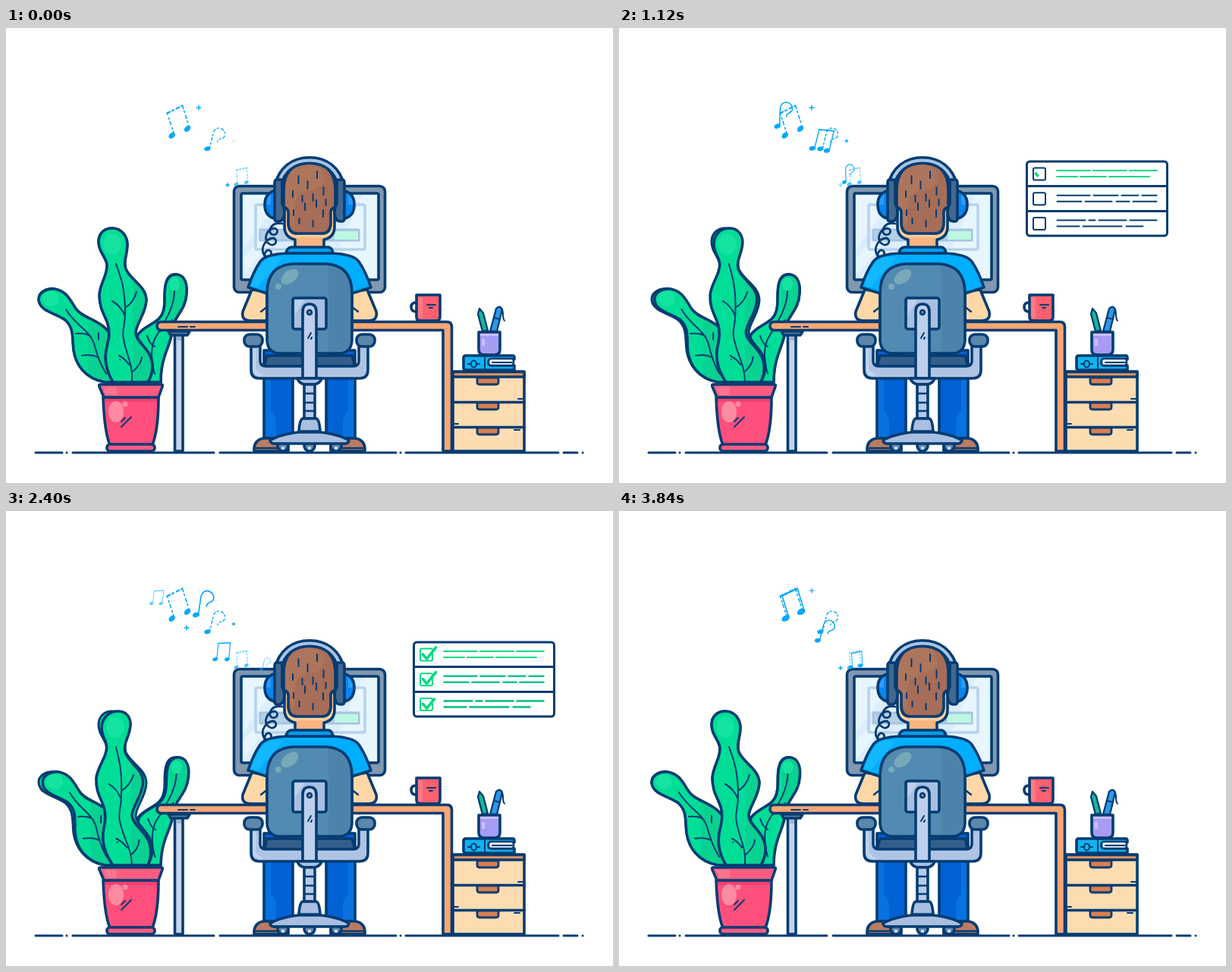
Animation, 800 px wide and 600 px high, one loop 3.88 s. Source, as an HTML page:

```html
<!DOCTYPE html>
<html lang="en">
<head>
<meta charset="utf-8">
<title>Working with music</title>
<style>
html, body { margin: 0; width: 100%; height: 100%; overflow: hidden; background: #fff; }
svg { display: block; }
#stage { stroke: #043c72; stroke-width: 3.6; stroke-linecap: round; stroke-linejoin: round; }
.fill { stroke: none; }
.line { fill: none; }
.thin { fill: none; stroke-width: 2; }
.blue { stroke: #00a8ff; fill: none; }
.head { fill: #00a8ff; stroke: none; }
.trace { stroke-width: 1.1; stroke-dasharray: 4 3 2 4; }
.done { stroke: #00d981; }
.rest { fill: #00dc96; stroke-width: 3; }
</style>
</head>
<body>
<svg id="stage" width="800" height="600" viewBox="0 0 800 600">
<defs>
  <linearGradient id="leafShade"><stop offset=".64" stop-color="#00dd97"/><stop offset=".64" stop-color="#08d192"/></linearGradient>
  <linearGradient id="chairShade"><stop offset=".72" stop-color="#528ab1"/><stop offset=".72" stop-color="#4d83ab"/></linearGradient>
  <g id="double">
    <path stroke-width="1.5" d="M-7,14V-14M14,-17V12"/><path stroke-width="2" d="M-7,-14L14,-17"/>
    <ellipse class="head" cx="-10" cy="14.5" rx="4.600" ry="3.200" transform="rotate(-25 -10 14.5)"/>
    <ellipse class="head" cx="11" cy="12.5" rx="4.600" ry="3.200" transform="rotate(-25 11 12.5)"/>
  </g>
  <g id="single">
    <path stroke-width="1.6" d="M-3,15V-10C-2,-22 14,-20 14,-9C14,-3 6,-5 6,2"/>
    <ellipse class="head" cx="-6" cy="15.5" rx="4.600" ry="3.200" transform="rotate(-25 -6 15.5)"/>
  </g>
</defs>

<path class="line" stroke-width="3" d="M39,560H74M80,560h.1M88,560H274M282,560H514M520,560h.1M527,560H728M735,560H753M760,560h.1"/>

<g id="plant"></g>
<g id="pot">
  <path fill="#ff4f7d" d="M128,487C129,515 131,538 138,552H192C199,536 201,510 201,487Z"/>
  <path class="fill" fill="#f43f71" d="M130,489H199V493H131Z"/>
  <ellipse class="fill" fill="#ff8b9f" cx="145" cy="506" rx="10" ry="14"/>
  <circle class="fill" fill="#ff8b9f" cx="157" cy="496" r="3.5"/>
  <path class="thin" d="M152,526L165,513M152,519L157,514"/>
  <path fill="#ff5c82" d="M124,470H205Q207,470 206,473L201,487H129L123,473Q122,470 124,470Z"/>
  <path class="fill" fill="#ff7590" d="M128,473H146V484H132Z"/>
  <rect x="133" y="549" width="63" height="9" rx="4" fill="#ff5c82"/>
</g>

<g id="monitor">
  <rect x="300.500" y="208.500" width="199" height="140" rx="7" fill="#8298b1"/>
  <rect x="310" y="218" width="181" height="114" rx="2" fill="#daeeff"/>
  <path class="fill" fill="#e7f5ff" d="M312,220H366L312,292ZM312,304L386,220H402L314,325ZM470,220H489V330H420Z"/>
  <rect class="line" x="329" y="233" width="144" height="59" rx="2" stroke="#b7d2ec"/>
  <rect x="335" y="266" width="130" height="14" fill="#b5cfe6" stroke="#a8c3df" stroke-width="3"/>
  <rect class="fill" x="433" y="268" width="31" height="11" fill="#bdf7e2"/>
</g>

<g id="desk">
  <rect x="222.500" y="402" width="10.500" height="156" fill="#c6d4ea"/>
  <path class="fill" fill="#9db4d4" d="M224,406H231V412H224Z"/>
  <path fill="#5f84a8" d="M214,400H242L239,405H217Z"/>
  <path fill="#fba674" d="M204,387.500H581Q587.500,387.500 587.500,394V558H576V398.500H204Q199,398 199,393Q199,388 204,387.500Z"/>
  <path class="thin" d="M227,394H239M243,394H249"/>
</g>

<g id="mug">
  <path class="line" d="M541,362Q534,362 534,368Q534,374 541,374"/>
  <path fill="#ff6070" d="M541,352H572V381Q572,386 567,386H546Q541,386 541,381Z"/>
  <path class="fill" fill="#ff7a84" d="M543,355H549V383H546Q543,383 543,380Z"/>
  <path class="thin" d="M555,365H566M558,369H562" stroke-width="1.800"/>
</g>

<g id="drawers">
  <rect x="589" y="453" width="94" height="105" fill="#fddcb2"/>
  <rect x="589" y="453.500" width="94" height="6.500" fill="#e4925e"/>
  <path class="line" d="M589,493.500H683M589,526.500H683"/>
  <path fill="#d97f4f" stroke-width="2.800" d="M621,461H649V467Q649,470 646,470H624Q621,470 621,467ZM621,494H649V500Q649,503 646,503H624Q621,503 621,500ZM621,527H649V533Q649,536 646,536H624Q621,536 621,533Z"/>
  <path class="thin" d="M675,489H681M590,522H596M670,530H677"/>
</g>

<g id="books">
  <path fill="#11b2ef" d="M606,432H668Q670,432 670,435V437H641Q636,437 636,441Q636,445 641,445H670V451H606Q603,451 603,448V435Q603,432 606,432Z"/>
  <rect x="636" y="436" width="33" height="9" rx="3" fill="#e8f2fb" stroke-width="2.500"/>
  <path class="thin" d="M641,441H667M631,433V450M609,443h3M621,443h3" stroke-width="1.800"/>
  <ellipse class="thin" cx="616.500" cy="443" rx="3.500" ry="4.500"/>
  <path fill="#16b79a" stroke-width="2.300" d="M628,400L622,377L624,370L629,376L635,399Z"/>
  <path fill="#2c98e8" stroke-width="2.300" d="M638,400L646,370Q651,365 654,371L647,400Z"/>
  <path class="thin" stroke-width="1.800" d="M643,382L651,384M653,370C657,374 653,381 657,386"/>
  <path fill="#a89bf3" d="M623,401H651V424Q651,431 644,431H630Q623,431 623,424Z"/>
  <path class="fill" fill="#c9c0ff" d="M625,403H649V406H625ZM627,410H631V419H627Z"/>
</g>

<path class="line" stroke-width="2.800" d="M364,258C350,255 344,268 350,272C357,275 361,266 354,264C343,265 339,279 346,284C353,290 360,281 353,277C342,277 335,290 340,299C346,306 354,297 347,293C342,292 339,300 342,305"/>

<g id="man">
  <g id="legSide">
    <path fill="#0062d5" d="M340,425H378V541H340Z"/>
    <path class="fill" fill="#0872de" d="M342,463H349V505Q356,510 356,520V539H342Z"/>
    <path fill="#bb7b62" d="M340,541H368Q373,548 372,558H327Q326,543 340,541Z"/>
    <path class="line" stroke-width="2.500" d="M328,554H372"/>
  </g>
  <use href="#legSide" transform="matrix(-1 0 0 1 800 0)"/>
  <g id="armSide">
    <path fill="#ffd7a7" d="M324,345L312,374Q310,386 322,386H345V348Z"/>
    <path class="line" stroke-width="2.500" d="M345,367L336,374"/>
  </g>
  <use href="#armSide" transform="matrix(-1 0 0 1 800 0)"/>
  <path fill="#ffd09b" d="M367,236V262Q367,276 381,279V292H419V279Q433,276 433,262V236Z"/>
  <path class="fill" fill="#f8b581" d="M383,276H417V288H383Z"/>
  <path fill="#00aeff" d="M372,297H428Q458,298 465,308Q474,321 481,342L456,350V400H344V350L319,342Q326,321 335,308Q342,298 372,297Z"/>
  <path class="fill" fill="#14b8ff" d="M348,302H366L332,342L323,340Q332,310 348,302Z"/>
  <path fill="#099cec" d="M376,289H425Q430,290 431,297H369Q370,290 376,289Z"/>
  <path fill="#a66d58" d="M366,214Q366,178 400,178Q434,178 434,214V236Q427,238 428,246V259Q427,271 416,271H384Q373,271 372,259V246Q373,238 366,236Z"/>
  <path class="fill" fill="#ae755d" d="M368,214Q369,181 400,180Q418,182 420,196Q419,212 400,214Q381,216 380,236V262Q375,261 374,250Q376,238 368,234Z"/>
  <path class="thin" stroke-width="1.600" d="M385.500,195v10M410,189v9M397.500,202v10M378,215v8M418.500,210v10M390.500,221v8M404.500,219v9M421.500,226v8M394,231v9M409,227v9M379,240v7M386.500,251v7M418,240v9M404.500,254v8"/>
  <path class="line" stroke-width="11" d="M358,208C363,186 379,174.500 400,174.500S437,186 442,208"/>
  <path class="line" stroke="#a9c4e5" stroke-width="4" d="M358,209C363,186 379,174.500 400,174.500S437,186 442,209"/>
  <g id="earSide">
    <path fill="#0786ef" d="M358,214Q341,216 341,233Q341,250 358,252Z"/>
    <path class="fill" fill="#2b9bfa" d="M349,219Q343,224 343,233H349Z"/>
    <path fill="#42688f" d="M357,200H363Q364,200 364,205V232Q367,236 367,244Q366,255 360,255H357Q354,255 354,250V204Q354,200 357,200Z"/>
  </g>
  <use href="#earSide" transform="matrix(-1 0 0 1 800 0)"/>
</g>

<g id="chair">
  <path fill="#345f8b" d="M344,432H456L460,446H340Z"/>
  <path fill="#afc4e4" d="M323,416H335V440Q336,446 342,446H458Q464,446 465,440V416H477V451Q477,462 466,462H334Q323,462 323,451Z"/>
  <path class="fill" fill="#c3d4ee" d="M326,423H329V448Q330,454 338,457V459Q326,460 326,450Z"/>
  <rect x="314" y="404" width="24" height="16" rx="7" fill="#5b87aa"/>
  <rect x="462" y="404" width="24" height="16" rx="7" fill="#5b87aa"/>
  <path fill="url(#chairShade)" d="M378,311H422Q455,313 456,348V412Q455,428 440,429H360Q345,428 344,412V348Q345,313 378,311Z"/>
  <ellipse class="fill" fill="#78a9b9" cx="374" cy="328" rx="13" ry="8" transform="rotate(-38 374 328)"/>
  <circle class="fill" fill="#78a9b9" cx="359" cy="341" r="4"/>
  <rect x="378" y="356" width="44" height="41" rx="3" fill="#a8bfe1"/>
  <path class="fill" fill="#bed1ed" d="M381,359H393L381,378Z"/>
  <path fill="#bdcfec" d="M391,462V374Q391,364 400,364T409,374V462Z"/>
  <circle cx="400" cy="375" r="3" fill="#6c8bb0" stroke-width="2.500"/>
  <path class="thin" d="M398,409L402,402M402,410L403,408"/>
  <path fill="#a8bfe1" d="M384,462H416Q414,469 406,470H394Q386,469 384,462Z"/>
  <path fill="#b7cae7" d="M393,470H407V515H393Z"/>
  <path class="line" stroke-width="2.500" d="M394,482H406M394,494H406M394,505H406"/>
  <path fill="#a8bfe1" d="M391,515H409Q413,516 414,532H386Q387,516 391,515Z"/>
  <g fill="#6484aa"><circle cx="365" cy="551" r="7"/><circle cx="400" cy="551" r="7"/><circle cx="435" cy="551" r="7"/></g>
  <path fill="#a8bfe1" d="M386,533H414Q440,536 452,544Q451,549 444,548H356Q349,549 348,544Q360,536 386,533Z"/>
  <path class="fill" d="M363,552h4v4h-4zM398,552h4v4h-4zM433,552h4v4h-4z" fill="#c8d9f0"/>
</g>

<path id="wisp" class="line" stroke="#aebbca" stroke-width="1.200" d="M552,345Q561,342 557,336Q551,331 556,327"/>
<path id="puff" class="line" stroke="#bdc8d6" stroke-width="1.200" d="M546,306C547,293 565,293 565,309"/>

<g id="card"></g>

<g class="blue trace">
  <use href="#double" transform="translate(224 124) rotate(-18) scale(1.050)"/>
  <use href="#single" transform="translate(274 147) rotate(14) scale(.9)"/>
  <use href="#double" transform="translate(309 196) rotate(-5) scale(.65)" opacity=".7"/>
</g>
<g id="notes" class="blue"></g>
<g id="sparks" class="blue" stroke-width="1.500"></g>
</svg>

<script>
const LOOP = 3880;
const $ = id => document.getElementById(id);
const clamp = v => Math.max(0, Math.min(1, v));

function add(parent, tag, attrs) {
  const el = document.createElementNS('http://www.w3.org/2000/svg', tag);
  for (const name in attrs) el.setAttribute(name, attrs[name]);
  return parent.appendChild(el);
}

// Linear interpolation through rows of [time, value, value, ...]
function track(rows, t) {
  if (t <= rows[0][0]) return rows[0].slice(1);
  const i = rows.findIndex(row => row[0] > t);
  if (i < 0) return rows[rows.length - 1].slice(1);
  const a = rows[i - 1], b = rows[i], p = (t - a[0]) / (b[0] - a[0]);
  return a.slice(1).map((v, n) => v + (b[n + 1] - v) * p);
}

// Plant: each leaf bends by a horizontal offset that depends on height
const breeze = t => (1 - Math.cos(2 * Math.PI * t / LOOP)) / 2;
const leaves = [
  {
    body: 'M186,467C186,450 168,420 174,404C184,390 205,390 208,370C210,362 208,352 210,340C212,328 218,324 226,325C236,327 239,338 238,350C237,372 222,380 220,394C218,420 204,430 204,467Z',
    vein: 'M222,347C222,370 206,392 196,410Q188,428 196,456M186,406Q190,418 196,420M219,385Q211,396 203,400',
    shine: [222, 338, 7, 9],
    bend: (h, t) => track([[0, 0], [1200, 0], [2700, 4], [3240, 4], [3840, .5], [LOOP, 0]], t)[0] * h * 1.35
  }, {
    body: 'M130,467C104,462 92,444 89,425C87,408 90,396 78,385C66,376 44,374 43,358C43,348 54,343 64,344C80,347 84,358 92,370C100,382 120,384 132,397Q142,405 145,425L145,467Z',
    vein: 'M79,371C91,392 109,397 116,416Q122,440 132,456M92,403Q106,402 112,407M122,402L122,411M100,432Q113,430 120,434',
    shine: [59, 357, 11, 10],
    bend: (h, t) => breeze(t) * 6 * Math.min(1, h * 2)
  }, {
    body: 'M141,467C132,452 129,436 133,420C136,408 137,400 134,390C130,378 123,370 123,352C124,336 134,326 133,312C131,300 122,296 122,282C122,270 130,264 140,264C152,264 160,274 160,286C160,300 154,306 158,318C164,332 184,340 185,358C185,376 171,390 171,402C172,416 193,424 193,446C193,454 190,462 187,467Z',
    vein: 'M145,311C152,330 157,345 157,375C157,395 152,400 155,410C158,430 168,445 166,466M140,360Q151,366 157,380M172,348Q168,362 157,369M149,432Q157,436 162,444M179,434Q178,444 167,453M150,437h.1',
    shine: [140, 285, 12, 14],
    bend: (h, t) => breeze(t) * (40 * h * h - 31 * h)
  }
];
for (const leaf of leaves) {
  add($('plant'), 'path', { class: 'rest', d: leaf.body });
  leaf.bodyEl = add($('plant'), 'path', { fill: 'url(#leafShade)', d: leaf.body });
  const [cx, cy, rx, ry] = leaf.shine;
  leaf.shineEl = add($('plant'), 'ellipse', { class: 'fill', fill: '#14e4a0', cx, cy, rx, ry });
  leaf.veinEl = add($('plant'), 'path', { class: 'thin', d: leaf.vein });
}
function drawPlant(t) {
  for (const { body, vein, shine, bend, bodyEl, veinEl, shineEl } of leaves) {
    const shift = y => bend((467 - y) / 203, t);
    const warp = d => d.replace(/([\d.]+),([\d.]+)/g, (_, x, y) => `${+x + shift(y)},${y}`);
    bodyEl.setAttribute('d', warp(body));
    veinEl.setAttribute('d', warp(vein));
    shineEl.setAttribute('cx', shine[0] + shift(shine[1]));
  }
}

// Checklist card, drawn from its own top-left corner
const rows = [
  { start: 1080, d: 'M40,12H83M88,12H131M136,12H171M40,20H66M71,20H104M109,20H161' },
  { start: 1500, d: 'M40,12H83M88,12H120M125,12H147M152,12H171M40,20H72M77,20H112M118,20H135M140,20H171' },
  { start: 2120, d: 'M40,12H77M82,12H90M95,12H131M136,12H171M40,20H69M74,20H125M131,20H153' }
];
add($('card'), 'rect', { width: 185, height: 98, rx: 4, fill: '#fff', 'stroke-width': 3 });
add($('card'), 'path', { class: 'line', 'stroke-width': 3, d: 'M0,32.500H185M0,65.500H185' });
rows.forEach((row, i) => {
  const g = add($('card'), 'g', { transform: `translate(0 ${i * 32.7})` });
  row.box = add(g, 'rect', { class: 'thin', x: 8.5, y: 8.5, width: 16, height: 16, rx: 2 });
  add(g, 'path', { class: 'thin', d: row.d });
  row.wipe = add(g, 'svg', { width: 0, height: 30 });
  add(row.wipe, 'path', { class: 'thin done', d: row.d });
  row.tick = add(g, 'path', { class: 'line done', d: 'M12,16L17,22L29,7', pathLength: 1 });
});
function drawCard(t) {
  const [y, opacity] = track([[200, 202, 0], [480, 188.5, .48], [740, 179, 1], [1120, 176, 1], [2040, 171.5, 1],
    [2760, 174.5, 1], [3080, 172, 1], [3240, 167, .7], [3520, 150, 0]], t);
  $('card').setAttribute('transform', `translate(537.500 ${y})`);
  $('card').setAttribute('opacity', opacity);
  for (const { start, box, wipe, tick } of rows) {
    const p = clamp((t - start) / 320);
    box.style.stroke = p > .3 ? '#00d981' : '';
    wipe.setAttribute('width', 180 * clamp((t - start + 260) / 280));
    tick.setAttribute('opacity', p > 0 ? 1 : 0);
    tick.setAttribute('stroke-dasharray', `${p} 2`);
  }
}

// Notes leave the headphones at equal intervals: age, x, y, rotation, scale, opacity
const flight = [
  [-300, 350, 216, 10, .3, 0], [-150, 346, 210, 12, .45, .5], [0, 340, 201, 12, .5, .7],
  [490, 309, 196, -5, .65, 1], [970, 283, 185, 6, .75, 1], [1310, 272, 165, 14, .85, 1],
  [1610, 267, 148, 14, .92, 1], [1940, 258, 121, 8, 1, 1], [2280, 230, 119, -18, 1.05, 1],
  [2400, 226, 124, -17, 1.05, 1], [2580, 215, 115, 2, .95, 1], [2760, 202, 114, 6, .65, .75],
  [2910, 198, 114, 6, .58, .6], [3060, 193, 108, 6, .5, 0]
];
const notes = [0, 1, 2, 3].map(k => add($('notes'), 'use', { href: k % 2 ? '#double' : '#single' }));
function drawNotes(t) {
  $('notes').setAttribute('opacity', t < 80 ? 0 : 1);
  notes.forEach((note, k) => {
    const age = (t - 180 + k * LOOP / 4 + LOOP) % LOOP - 300;
    const [x, y, angle, size, opacity] = track(flight, age);
    note.setAttribute('transform', `translate(${x} ${y}) rotate(${angle}) scale(${size})`);
    note.setAttribute('opacity', opacity);
  });
}

// Sparkles: x, y, radius, moment of greatest brightness in their beat
const sparks = [[254, 105, 2.7, 150], [238, 154, 2.7, 480], [300, 149, 1.7, 300], [292, 207, 2.2, 870]].map(
  ([x, y, r, peak]) => ({ peak, el: add($('sparks'), 'path', { d: `M${x - r},${y}H${x + r}M${x},${y - r}V${y + r}` }) }));
function drawSparks(t) {
  for (const { peak, el } of sparks) {
    const beat = (1 + Math.cos(2 * Math.PI * (t - peak) / (LOOP / 4))) / 2;
    el.setAttribute('opacity', clamp(beat * 1.8 - .4));
  }
}

function drawSteam(t) {
  $('wisp').setAttribute('opacity', track([[1700, 0], [2040, .45], [2400, 0]], t)[0]);
  $('wisp').setAttribute('transform', `translate(0 ${(2040 - t) * .035})`);
  $('puff').setAttribute('opacity', track([[2400, 0], [2760, .6], [3150, 0]], t)[0]);
}

function frame() {
  const t = Math.floor(performance.now() % LOOP / 40) * 40;
  for (const draw of [drawPlant, drawCard, drawNotes, drawSparks, drawSteam]) draw(t);
  requestAnimationFrame(frame);
}
frame();
</script>
</body>
</html>
```
